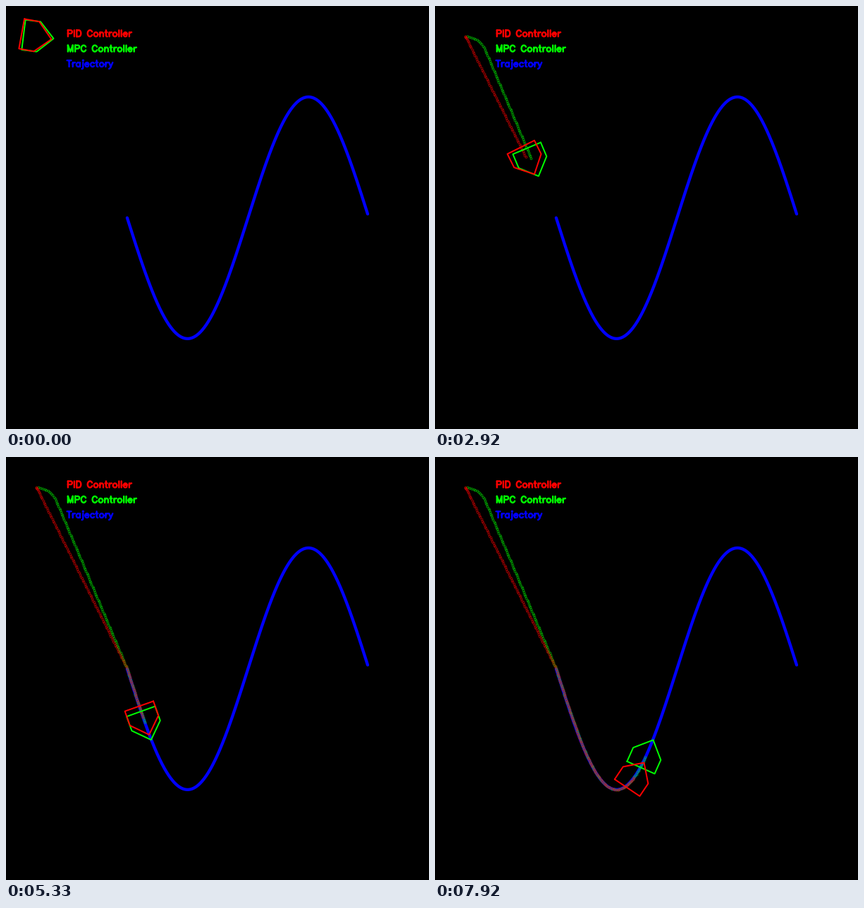
A matplotlib script that plays this animation: 600x600 px, repeating every 8 s.

```python
import numpy as np
import matplotlib.pyplot as plt
from matplotlib.animation import FuncAnimation

WORLD = 700                      # world units across the stage
UNIT = 6 * 72 / WORLD            # one world unit in points
LOOP, TICK, STEPS = 8000, 20, 96
RED, GREEN, BLUE = "#ff0000", "#00ff00", "#0000ff"

START = np.array([50.0, 50.0])
GOAL = np.array([200.0, 350.0])  # where the wave begins
SPEED = 6.86                     # world units per step

fig = plt.figure(figsize=(6, 6), dpi=100, facecolor="black")
ax = fig.add_axes([0, 0, 1, 1])
ax.set_xlim(-0.5, WORLD - 0.5)
ax.set_ylim(WORLD - 0.5, -0.5)
ax.axis("off")


def stroke(x, y, color, width, z):
    return ax.plot(x, y, color=color, lw=width * UNIT, zorder=z,
                   solid_capstyle="round", solid_joinstyle="round")[0]


# Single-stroke lettering: cap height 21, x-height 14, baseline 0
def arc(cx, cy, rx, ry, a0, a1):
    a = np.radians(np.linspace(a0, a1, 17))
    return list(zip(cx + rx * np.cos(a), cy + ry * np.sin(a)))


def bar(x, top):
    return [(x, top), (x, 0)]


BOWL = arc(9.5, 7, 6.5, 7, 36, 324)

# letter: (advance, strokes)
GLYPHS = {
    " ": (16, []),
    "C": (21, [arc(11, 10.5, 8, 10.5, 30, 330)]),
    "D": (21, [bar(4, 21), [(4, 21)] + arc(11, 10.5, 7, 10.5, 90, -90) + [(4, 0)]]),
    "I": (8, [bar(4, 21)]),
    "M": (24, [bar(4, 21), [(4, 21), (12, 0), (20, 21)], bar(20, 21)]),
    "P": (21, [bar(4, 21), [(4, 21)] + arc(13, 15.5, 5, 5.5, 90, -90) + [(4, 10)]]),
    "T": (16, [bar(8, 21), [(1, 21), (15, 21)]]),
    "a": (19, [bar(15, 14), BOWL]),
    "c": (18, [BOWL]),
    "e": (18, [[(3, 8)] + arc(9, 7, 6, 7, 8, 324)]),
    "j": (10, [arc(6, 21, 1, 1, 0, 360), [(6, 14)] + arc(2, -3, 4, 4, 0, -90)]),
    "l": (8, [bar(4, 21)]),
    "n": (19, [bar(4, 14), arc(9.5, 8.5, 5.5, 5.5, 180, 0) + [(15, 0)]]),
    "o": (19, [arc(9.5, 7, 6.5, 7, 0, 360)]),
    "r": (13, [bar(4, 14), arc(11, 8, 7, 6, 180, 85)]),
    "t": (12, [[(5, 21)] + arc(9, 4, 4, 4, 180, 270), [(2, 14), (9, 14)]]),
    "y": (16, [[(2, 14), (8, 0)], [(14, 14), (6, -4), (2, -7)]]),
}


def write(text, row, color, x=100, scale=0.5):
    pts = []
    for ch in text:
        advance, lines = GLYPHS[ch]
        for line in lines:
            pts += [(x + u * scale, row - v * scale) for u, v in line]
            pts.append((np.nan, np.nan))
        x += advance * scale
    stroke(*np.transpose(pts), color, 2.8, 2)


write("PID Controller", 50, RED)
write("MPC Controller", 75, GREEN)
write("Trajectory", 100, BLUE)

wave_x = np.linspace(200, 598, 600)
wave = np.column_stack([wave_x, 350 + 200 * np.sin(np.pi * (wave_x - 200) / 200)])
stroke(wave[:, 0], wave[:, 1], BLUE, 5, 1)


def approach(max_turn):
    """Drive to the goal, turning at most max_turn degrees per unit."""
    pts, angle = [START], 0.0
    while np.hypot(*(GOAL - pts[-1])) > 2:
        dx, dy = GOAL - pts[-1]
        angle += np.clip(np.arctan2(dy, dx) - angle, 0, np.radians(max_turn))
        pts.append(pts[-1] + (np.cos(angle), np.sin(angle)))
    return pts


class Car:
    BODY = 25 * np.array([(-1, -1), (0, -1), (1, 0), (0, 1), (-1, 1), (-1, -1)])

    def __init__(self, color, z, max_turn, dist, offset=0):
        path = np.vstack([approach(max_turn), wave])
        length = np.append(0, np.cumsum(np.hypot(*np.diff(path, axis=0).T)))

        def at(s):
            return np.column_stack([np.interp(s, length, c) for c in path.T])

        t = np.arange(0, STEPS, 0.5)
        s = dist(t)
        ahead = at(s + 4.5) - at(s - 4.5)
        self.pos = at(s)
        # a starting heading offset dies out quickly
        self.angle = (np.arctan2(ahead[:, 1], ahead[:, 0])
                      + np.radians(offset) * np.exp(-t / 1.8))
        self.body = stroke([], [], color, 2.3, z)
        self.trail, = ax.plot([], [], "o", ms=3.4 * UNIT, mfc="none", mec=color,
                              mew=0.9 * UNIT, alpha=0.7, zorder=z - 2)

    def show(self, step):
        i = 2 * step
        c, s = np.cos(self.angle[i]), np.sin(self.angle[i])
        body = self.BODY @ np.array([[c, s], [-s, c]]) + self.pos[i]
        self.body.set_data(*body.T)
        self.trail.set_data(*self.pos[:max(0, i - 1)].T)
        return [self.trail, self.body]


def steady(t):
    return SPEED * (t + 0.5)


def eased(t):
    # slow start, then a gentle loss of speed along the wave
    return (SPEED * (t - 1.5 * (1 - np.exp(-t / 1.5)))
            - 0.017 * np.maximum(t - 50, 0) ** 2)


cars = [Car(GREEN, 5, 1.6, steady), Car(RED, 6, 90, eased, offset=-53)]


def update(n):
    step = int((n * TICK + 14) * STEPS / LOOP)
    return [artist for car in cars for artist in car.show(step)]


anim = FuncAnimation(fig, update, frames=LOOP // TICK, interval=TICK,
                     init_func=lambda: update(0), repeat=True, repeat_delay=0)
plt.show()
```
